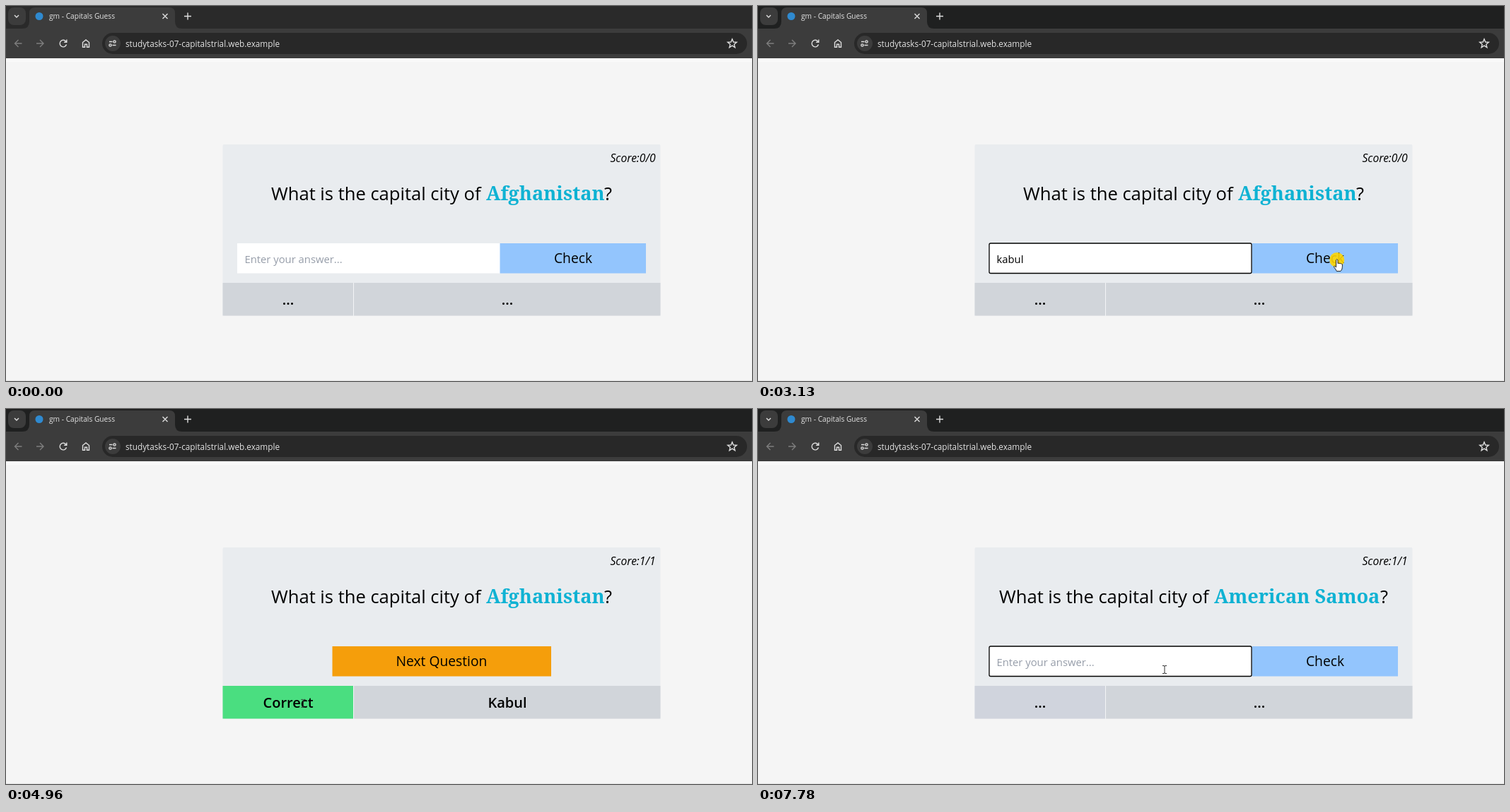
These frames come from a looping animation (1055 by 531 pixels, 8000 ms). An HTML page:

```html
<!DOCTYPE html>
<html lang="en">
<head>
<meta charset="utf-8">
<title>Capitals</title>
<style>
  html, body { margin: 0; width: 100%; height: 100%; overflow: hidden; background: #f5f5f5; }
  svg { display: block; font-family: "Open Sans", "Noto Sans", sans-serif; }
  text { white-space: pre; }
  .icon { fill: none; stroke: #dedede; stroke-width: 1.4; }
  .dim { stroke: #7d7d7d; }
  .ui { fill: #e3e3e3; }
  .mid { text-anchor: middle; }
  .question { font-size: 25.6px; }
  .country { font: 700 27.2px "Noto Serif", serif; fill: #0fb2d3; }
  .button { font-size: 19.3px; }
  .result { font-size: 20px; font-weight: 600; }
  .field { font-size: 14.8px; }
  .pointer { fill: #fff; stroke: #111; stroke-width: .9; stroke-linejoin: round; }
</style>
</head>
<body>
<svg width="1055" height="531" viewBox="0 0 1055 531">
  <!-- browser bar -->
  <rect id="strip" width="1055" height="34"/>
  <rect x="3" y="2" width="25" height="25" rx="8" fill="#3c3c3c"/>
  <path d="M0 74V32H23Q33 32 33 22V10Q33 2 41 2H231Q239 2 239 10V22Q239 32 249 32H1055V74Z" fill="#3c3c3c"/>
  <rect x="136" y="38" width="912" height="30" rx="15" fill="#282828"/>
  <circle cx="151" cy="53" r="11" fill="#3c3c3c"/>
  <circle cx="47" cy="14.5" r="5.5" fill="#2f8ad0"/>
  <g class="icon">
    <path d="M12 13l3 3 3-3M221.5 11l7 7m0-7l-7 7M252 14.5h10m-5-5v10"/>
    <path class="dim" d="M22.5 53h-10m5-5l-5 5 5 5M43 53h10m-5-5l5 5-5 5"/>
    <path d="M85 50.5A4.8 4.8 0 1 0 85.5 54.5M85.8 47.5v3.7h-3.7"/>
    <path d="M108.5 51.5L113 48l4.5 3.5v6.8h-3v-4h-3v4h-3z"/>
    <path d="M146 50.5h4.5M150.5 55.5h5"/>
    <circle cx="153.5" cy="50.5" r="1.6"/>
    <circle cx="147.5" cy="55.5" r="1.6"/>
    <path d="M1027 46.8l1.7 4.2 4.6.3-3.5 2.9 1.1 4.5-3.9-2.5-3.9 2.5 1.1-4.5-3.5-2.9 4.6-.3z"/>
  </g>
  <text class="ui" x="61" y="18" font-size="10.2">gm - Capitals Guess</text>
  <text class="ui" x="169" y="57.5" font-size="11.75">studytasks-07-capitalstrial.web.example</text>

  <!-- page -->
  <rect y="74" width="1055" height="457" fill="#f5f5f5"/>
  <rect y="74" width="1055" height="5" fill="#fafafa"/>
  <rect y="530" width="1055" height="1" fill="#e4e4e4"/>
  <rect x="306.5" y="196" width="619" height="242.5" rx="2" fill="#e9ecef"/>
  <text id="score" x="854.5" y="221" font-size="15.7" font-style="italic"></text>
  <g class="question">
    <text id="lead" y="275">What is the capital city of</text>
    <text id="country" class="country" y="275"></text>
    <text id="mark" y="275">?</text>
  </g>

  <g id="form">
    <rect x="327" y="336" width="372" height="42.5" fill="#fff"/>
    <rect x="698.5" y="336" width="206.5" height="42.5" fill="#93c5fd"/>
    <text class="button mid" x="802" y="364">Check</text>
    <rect id="focus" x="327" y="336" width="371" height="42.5" rx="2" fill="#fff" stroke="#000" stroke-width="1.3"/>
    <text id="hint" class="field" x="337.5" y="363.5" fill="#969da9">Enter your answer...</text>
    <text id="answer" class="field" x="337.5" y="363.5"></text>
    <rect id="caret" y="348" width="1" height="19"/>
  </g>
  <g id="next">
    <rect x="461.5" y="336" width="309.5" height="42.5" fill="#f59e0b"/>
    <text class="button mid" x="616" y="364">Next Question</text>
  </g>

  <rect id="verdictCell" x="306.5" y="392" width="184.5" height="46.5"/>
  <rect x="491" y="392" width="1" height="46.5" fill="#f3f4f6"/>
  <rect x="492" y="392" width="433.5" height="46.5" fill="#d1d5da"/>
  <text id="verdict" class="result mid" x="399" y="423"></text>
  <text id="capital" class="result mid" x="709" y="423"></text>

  <!-- mouse -->
  <g id="mouse">
    <circle id="click" cy="1" r="10.5" fill="#ffd500" opacity=".9"/>
    <path id="arrow" class="pointer" d="M0 0V11.5L2.6 9 4.6 13.2 6.5 12.3 4.6 8.3H8Z"/>
    <path id="beam" d="M-3-5.5h2l1 .7 1-.7h2M0-5V5M-3 5.5h2l1-.7 1 .7h2" fill="none" stroke="#333"/>
    <path id="hand" class="pointer" d="M-1.2 1.2q1.2-2 2.4 0V6q1.2-1 2.2.2 1.2-.8 2.2.3 1.4-.4 2 .8V11q0 4-2.4 6H-.5q-.5-2-3.6-5.6-.6-1.6 1-1.6l1.9 1.6z"/>
  </g>
</svg>
<script>
const LOOP = 8000;
const FOCUS = 740, SOLVED = 3200, ADVANCE = 7170;
const KEYS = [1390, 1590, 1790, 1920, 2050];
const CARET_ON = [[FOCUS, 1260], [1390, 2530], [ADVANCE, 7780]];
const CLICKS = [[FOCUS, 800], [3070, SOLVED], [7045, ADVANCE]];

// time, x, y and, where it changes, the pointer shape
const PATH = [
  [70, 967, 518, 'arrow'], [200, 900, 470], [340, 780, 415], [470, 675, 374, 'beam'],
  [600, 611, 358], [735, 611, 358], [800, 607, 356], [2665, 607, 356],
  [2930, 702, 356, 'hand'], [3070, 815, 358], [SOLVED, 823, 359, 'arrow'], [3270, 825, 359],
  [3395, 825, 359], [3540, 783, 365], [3620, 768, 367, 'hand'], [3950, 640, 377, 'arrow'],
  [4340, 480, 387], [4410, 475, 392], [4560, 432, 409, 'beam'], [4760, 388, 415],
  [4955, 388, 415], [4960, 420, 417], [5100, 480, 400, 'arrow'], [5260, 550, 375, 'hand'],
  [5460, 640, 337, 'arrow'], [5640, 725, 280, 'beam'], [5720, 752, 264], [5800, 762, 260],
  [5900, 785, 250, 'arrow'], [6180, 851, 220], [6510, 974, 213], [6600, 974, 213],
  [6840, 880, 270], [6980, 750, 337, 'hand'], [7110, 684, 346], [ADVANCE, 682, 347, 'beam'],
  [7440, 593, 365], [7510, 590, 366], [7780, 575, 369]
];

const el = {};
document.querySelectorAll('[id]').forEach(node => el[node.id] = node);

const show = (node, on) => node.style.display = on ? '' : 'none';
const within = (spans, t) => spans.some(([from, to]) => t >= from && t < to);

function write(node, text) {
  if (node.textContent !== text) node.textContent = text;
}

function drawQuestion(country, ...xs) {
  write(el.country, country);
  [el.lead, el.country, el.mark].forEach((node, i) => node.setAttribute('x', xs[i]));
}

function drawMouse(t) {
  show(el.mouse, t >= PATH[0][0]);
  let i = 0, shape = 'arrow';
  while (i + 1 < PATH.length && PATH[i + 1][0] <= t) i++;
  for (const point of PATH.slice(0, i + 1)) shape = point[3] || shape;
  const [t0, x0, y0] = PATH[i];
  const [t1, x1, y1] = PATH[i + 1] || [LOOP, x0, y0];
  const k = Math.max(0, (t - t0) / (t1 - t0));
  el.mouse.setAttribute('transform', `translate(${x0 + (x1 - x0) * k} ${y0 + (y1 - y0) * k})`);
  for (const name of ['arrow', 'beam', 'hand']) show(el[name], name === shape);
  show(el.click, within(CLICKS, t));
}

function render(t) {
  const solved = t >= SOLVED, advanced = t >= ADVANCE, reveal = solved && !advanced;
  el.strip.setAttribute('fill', t < FOCUS ? '#2a2a2a' : '#1f2020');
  write(el.score, solved ? 'Score:1/1' : 'Score:0/0');
  if (advanced) drawQuestion('American Samoa', 341, 645, 880);
  else drawQuestion('Afghanistan', 375, 679, 846);

  show(el.form, !reveal);
  show(el.next, reveal);
  show(el.focus, t >= FOCUS);
  const typed = advanced ? '' : 'kabul'.slice(0, KEYS.filter(key => key <= t).length);
  write(el.answer, typed);
  show(el.hint, !typed);
  show(el.caret, within(CARET_ON, t));
  if (!reveal) el.caret.setAttribute('x', 338 + (typed && el.answer.getComputedTextLength()));

  el.verdictCell.setAttribute('fill', reveal ? '#4ade80' : advanced ? '#d0d4dd' : '#d1d5da');
  write(el.verdict, reveal ? 'Correct' : '...');
  write(el.capital, reveal ? 'Kabul' : '...');
  drawMouse(t);
}

const start = performance.now();
function tick() {
  render((performance.now() - start) % LOOP);
  requestAnimationFrame(tick);
}
tick();
</script>
</body>
</html>
```
